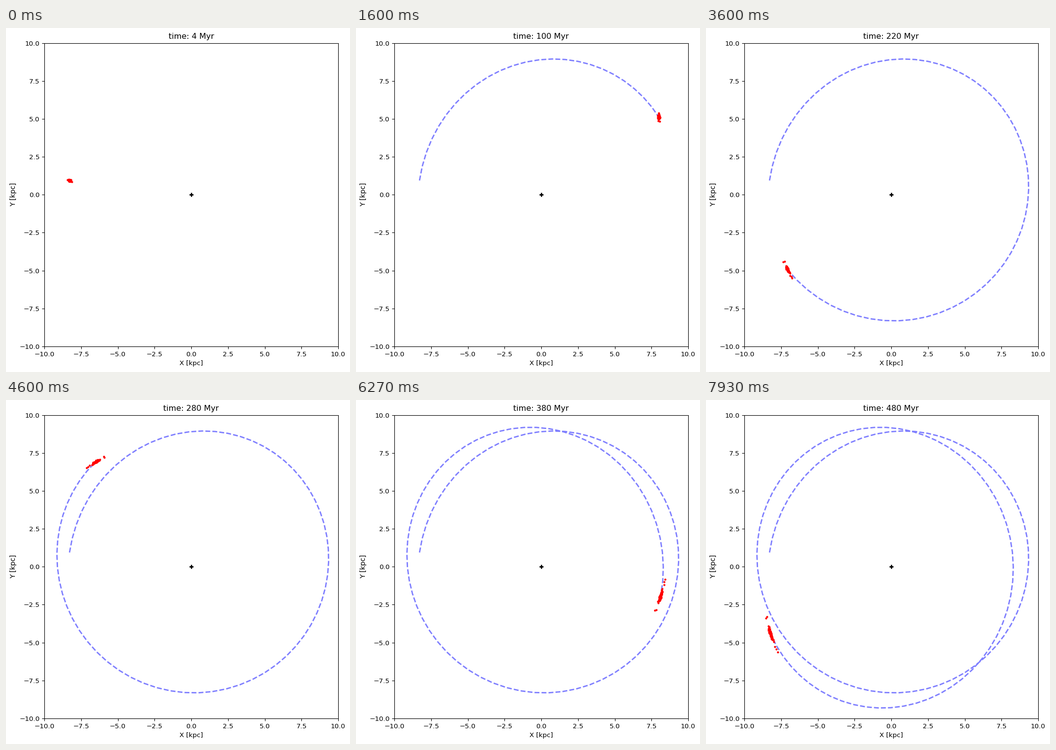
A matplotlib script for the animation above (8000 ms loop, 700 by 700 pixels).

```python
import numpy as np
import matplotlib.pyplot as plt
from matplotlib.animation import FuncAnimation

SIZE = 700
STEPS = 120
TICKS = 3          # drawn frames per time step
LOOP_MS = 8000
STEP_MYR = 4

# Precessing ellipse; angles in degrees, clockwise from the -x axis
PERI, APO = 8.30, 9.50
PERI_ANGLE, RADIAL_RATE = 22.5, 1.405
START, END = 6.47, 691.5
MEAN_R = 8.9

# Dash lengths in kpc
DASH, PERIOD = 0.3326, 0.4764


def radius(phi):
    lo, hi = 1 / APO, 1 / PERI
    wave = np.cos(np.radians(RADIAL_RATE * (phi - PERI_ANGLE)))
    return 1 / ((hi + lo) / 2 + (hi - lo) / 2 * wave)


def to_xy(r, phi):
    a = np.radians(phi)
    return -r * np.cos(a), r * np.sin(a)


# Equal areas in equal times give the angle at each step
grid = np.linspace(START, END, 4000)
area = np.cumsum(radius(grid) ** 2)
area = (area - area[0]) / (area[-1] - area[0])
angles = np.interp(np.linspace(0, 1, STEPS), area, grid)
track_x, track_y = to_xy(radius(angles), angles)
arc = np.append(0, np.cumsum(np.hypot(np.diff(track_x), np.diff(track_y))))


def dashes(length):
    """Points of the dashed track up to a given arc length."""
    starts = np.arange(0, length, PERIOD)[:, None]
    s = np.minimum(starts + np.linspace(0, DASH, 6), length)
    s = np.hstack([s, np.full_like(starts, np.nan)]).ravel()
    return np.interp(s, arc, track_x), np.interp(s, arc, track_y)


# Stars: a small spread in orbit size shears the cluster over time
rng = np.random.default_rng(7)
core = np.clip(rng.normal(0, 0.0025, 95), -0.006, 0.006)
spread = np.concatenate([core, [-0.0124, -0.0105, 0.0085, 0.0105, 0.0124]])
jitter_r = np.clip(rng.normal(0, 0.03, spread.size), -0.07, 0.07)
jitter_phi = np.clip(rng.normal(0, 0.22, spread.size), -0.45, 0.45)


def stars(phi):
    speed = (MEAN_R / radius(phi)) ** 2
    own = phi - spread * (phi - START) * speed + jitter_phi
    return to_xy(radius(own) * (1 + 1.2 * spread) + jitter_r, own)


plt.rcParams.update({"font.family": "DejaVu Sans", "font.size": 9.7})
fig = plt.figure(figsize=(7, 7), dpi=100, facecolor="white")
left, right, top, bottom = 78, 676, 30.6, 648
ax = fig.add_axes([left / SIZE, 1 - bottom / SIZE,
                   (right - left) / SIZE, (bottom - top) / SIZE])
ax.set_xlim(-10, 10)
ax.set_ylim(-10, 10)
ax.set_xlabel("X [kpc]")
ax.set_ylabel("Y [kpc]", fontsize=10, labelpad=3.8)
ax.tick_params(axis="y", length=3.4, pad=3.4)

title = ax.set_title("", fontsize=11.65)
path, = ax.plot([], [], "b-", lw=2, alpha=0.5, solid_capstyle="butt")
ax.plot(0, 0, "k+", ms=6, mew=2)
dots, = ax.plot([], [], "r.", ms=4)


def draw(frame):
    # Steps switch one tick early, as their times are rounded
    i = min((frame + 1) // TICKS, STEPS - 1)
    title.set_text(f"time: {STEP_MYR * (i + 1)} Myr")
    path.set_data(*dashes(arc[i]))
    dots.set_data(*stars(angles[i]))
    return title, path, dots


frames = STEPS * TICKS
anim = FuncAnimation(fig, draw, frames=frames, interval=LOOP_MS / frames,
                     repeat=True, repeat_delay=0, blit=False)
plt.show()
```
